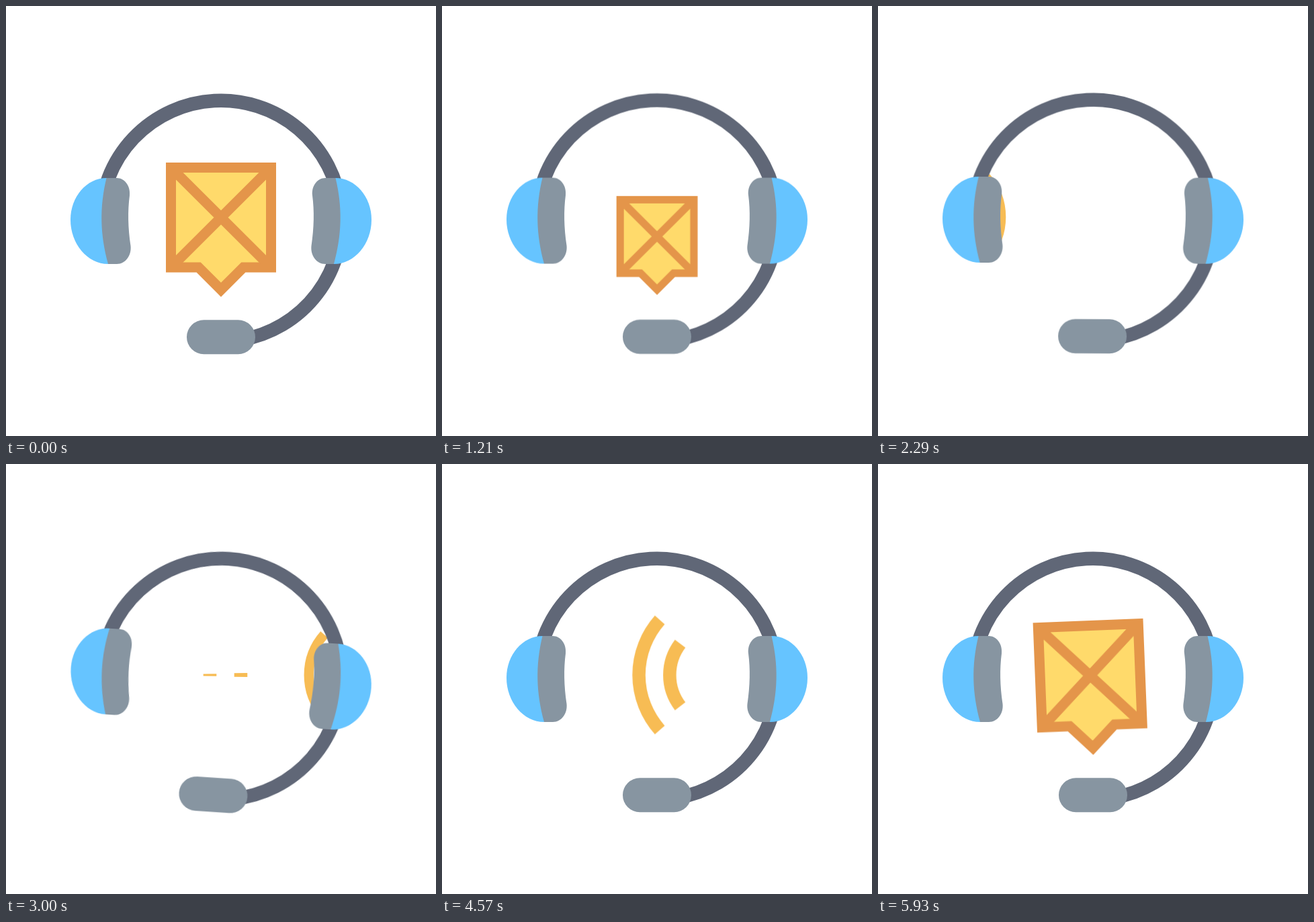
Recreate the animation shown at these times as an HTML page without scripts. Size 640 px wide and 640 px high, loop 6 s.

```html
<!DOCTYPE html>
<html lang="en">
<head>
<meta charset="utf-8">
<title>Support headset</title>
<style>
  html, body { margin: 0; width: 100%; height: 100%; overflow: hidden; background: #fff; }
  svg { display: block; width: 100vw; height: 100vh; }

  .jump, .tilt, .swing, .pop, .wave {
    animation-duration: 6s;
    animation-iteration-count: infinite;
    animation-timing-function: cubic-bezier(.333, 0, .667, 1);
  }
  .jump { animation-name: jump; }
  .tilt { animation-name: tilt; transform-origin: 320px 320px; }
  .swing { animation-name: swing; transform-origin: 320px 422px; }
  .pop { animation-name: pop; transform-origin: 320px 422px; }
  .wave { animation-name: fly, trim; animation-delay: var(--d); }

  @keyframes jump {
    0% { transform: translateY(0); }
    19.33% { transform: translateY(0); animation-timing-function: cubic-bezier(.6, 0, .67, 1); }
    31% { transform: translateY(-90px); }
    38.7%, 100% { transform: translateY(0); }
  }
  @keyframes tilt {
    0% { transform: rotate(0deg); }
    5% { transform: rotate(-7deg); }
    12.33% { transform: rotate(7deg); }
    19.33%, 36.5% { transform: rotate(0deg); }
    48% { transform: rotate(5deg); }
    57.5% { transform: rotate(-5deg); }
    65.5% { transform: rotate(5deg); }
    76%, 100% { transform: rotate(0deg); }
  }
  @keyframes pop {
    0%, 18.25% { transform: scale(1); }
    24%, 84.67% { transform: scale(0); }
    90%, 100% { transform: scale(1); }
  }
  @keyframes swing {
    0%, 84.67% { transform: rotate(0deg); }
    89.33% { transform: rotate(19deg); }
    94.67% { transform: rotate(-19deg); }
    100% { transform: rotate(0deg); }
  }
  /* out from behind an ear cup to the middle */
  @keyframes fly {
    0% { transform: translateX(-170px) scale(0); }
    2% { transform: translateX(-170px) scale(.7); }
    9%, 100% { transform: translateX(0) scale(1); }
  }
  /* both ends shrink to the middle of the arc */
  @keyframes trim {
    0%, 9.95% { stroke-dasharray: 0 0 100 100; }
    15.57%, 100% { stroke-dasharray: 0 50 0 100; }
  }
</style>
</head>
<body>
<svg viewBox="0 0 640 640">
  <defs>
    <g id="arcs">
      <path pathLength="100" d="M-32.25 -46.75A77.3 77.3 0 0 1 -32.25 46.75"/>
      <path pathLength="100" d="M-1.75 -82.25A123.9 123.9 0 0 1 -1.75 82.25"/>
    </g>
    <g id="ear">
      <path fill="#66c4ff" d="M149.5 256C120 256 96 284 96 318C96 354 121 384 152 384H156V256Z"/>
      <path fill="#8795a1" d="M149.5 256H165C176 256 185.500 267 184 282C181 305 181.500 330 185.500 357C187 371 178 384 165 384H152C140 340 139 300 149.500 256Z"/>
    </g>
  </defs>

  <g fill="none" stroke="#f7bc54" stroke-width="19.600">
    <g transform="translate(320 314)">
      <g class="wave" style="--d:-3897ms"><use href="#arcs"/></g>
      <g class="wave" style="--d:-2579ms"><use href="#arcs"/></g>
    </g>
    <g transform="translate(320 314) scale(-1 1)">
      <g class="wave" style="--d:-3203ms"><use href="#arcs"/></g>
      <g class="wave" style="--d:-1939ms"><use href="#arcs"/></g>
    </g>
  </g>

  <g class="swing">
    <g class="pop" fill="#ffda6b" stroke="#e4954a" stroke-width="15">
      <path d="M245.500 240.500H394.500V389H353.400L320 422.400L286.600 389H245.500Z"/>
      <path d="M245.500 240.500L394.500 389M394.500 240.500L245.500 389"/>
    </g>
  </g>

  <g class="jump">
    <g class="tilt">
      <path fill="none" stroke="#606777" stroke-width="20.500" d="M140.700 320A179.300 179.300 0 1 1 350 496.800"/>
      <use href="#ear"/>
      <use href="#ear" transform="matrix(-1 0 0 1 640 0)"/>
      <rect fill="#8795a1" x="269" y="467.300" width="102" height="51" rx="25.500"/>
    </g>
  </g>
</svg>
</body>
</html>
```
